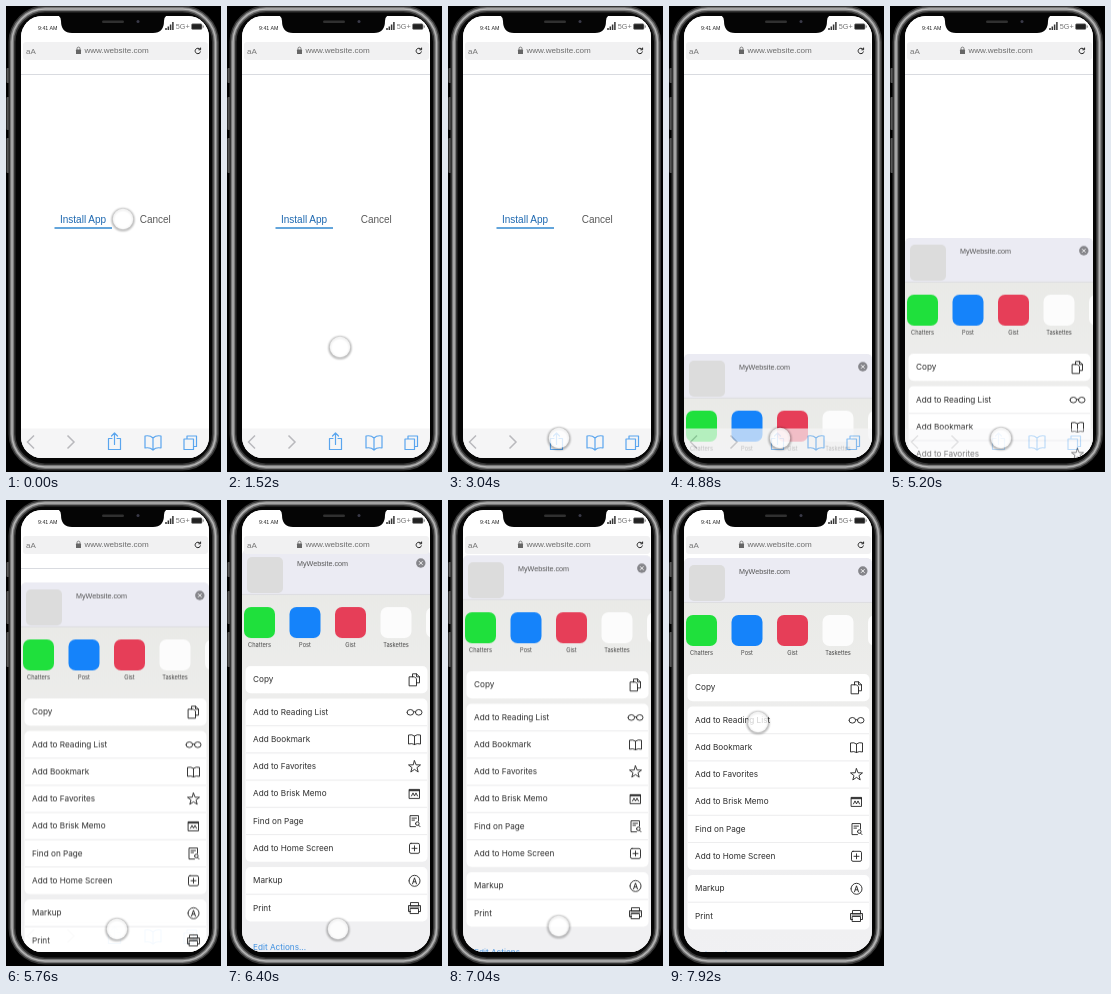
An HTML page for the animation above (8000 ms loop, 215 by 466 pixels).

```html
<!DOCTYPE html>
<html lang="en">
<head>
<meta charset="utf-8">
<title>Install from share sheet</title>
<style>
html, body { margin: 0; width: 100%; height: 100%; overflow: hidden; background: #000; }
svg { display: block; width: 100vw; height: 100vh; }
text { font-family: "Liberation Sans", Arial, sans-serif; }
.row, .label { font-family: Inter, Roboto, sans-serif; }
.row { font-size: 8.2px; fill: #2c2c2c; }
.label { font-size: 5.7px; fill: #444; text-anchor: middle; }
.line { fill: none; stroke: #222; stroke-width: .9; stroke-linejoin: round; stroke-linecap: round; }
.blue { fill: none; stroke: #5aa5ee; stroke-width: 1.2; stroke-linejoin: round; stroke-linecap: round; }

#prompt, #toolbar, #sheet, #touch { animation: 8s linear infinite; }
#prompt { animation-name: prompt; }
#toolbar { animation-name: toolbar; }
#sheet { animation-name: sheet; }
#touch { animation-name: touch; }

@keyframes prompt {
  0%, 48% { opacity: 1; }
  57%, 100% { opacity: 0; }
}
@keyframes toolbar {
  0%, 56.5% { opacity: 1; }
  61% { opacity: .7; }
  65% { opacity: .4; }
  72% { opacity: .06; }
  77%, 100% { opacity: 0; }
}
@keyframes sheet {
  0%, 56% { transform: translateY(466px); }
  58% { transform: translateY(433px); }
  61% { transform: translateY(348px); }
  65% { transform: translateY(232px); }
  67% { transform: translateY(179px); }
  69% { transform: translateY(134px); }
  72% { transform: translateY(82.5px); }
  74% { transform: translateY(64px); }
  76% { transform: translateY(54px); }
  78% { transform: translateY(50.5px); }
  80% { transform: translateY(50px); }
  84% { transform: translateY(52px); }
  89% { transform: translateY(56px); }
  94%, 100% { transform: translateY(58px); }
}
@keyframes touch {
  0%, 3% { transform: translate(117px, 213px); animation-timing-function: ease-in-out; }
  18%, 23% { transform: translate(113px, 341px); animation-timing-function: ease-in-out; }
  36%, 66% { transform: translate(111px, 432px); }
  71%, 87% { transform: translate(111px, 429px); animation-timing-function: ease-in-out; }
  99%, 100% { transform: translate(89px, 222px); }
}
</style>
</head>
<body>
<svg viewBox="0 0 215 466" preserveAspectRatio="none">
  <defs>
    <clipPath id="screen"><rect x="15" y="10" width="188" height="442" rx="21"/></clipPath>
    <linearGradient id="shade" x2="0" y2="1">
      <stop offset="0" stop-color="#e8e9e5"/>
      <stop offset=".3" stop-color="#ededec"/>
      <stop offset="1" stop-color="#f1f1f4"/>
    </linearGradient>
    <filter id="soft" x="-50%" y="-50%" width="200%" height="200%">
      <feGaussianBlur stdDeviation="1"/>
    </filter>
  </defs>

  <rect width="215" height="466" fill="#000"/>
  <g fill="#555">
    <rect x=".5" y="62" width="3" height="15" rx="1"/>
    <rect x=".5" y="91" width="3" height="33" rx="1"/>
    <rect x=".5" y="132" width="3" height="35" rx="1"/>
  </g>
  <g id="rim" fill="none">
    <rect x="6" y="3" width="203.500" height="458" rx="33" fill="#050505" stroke="#333" stroke-width="7"/>
    <rect x="6" y="3" width="203.500" height="458" rx="33" stroke="#777" stroke-width="4"/>
    <rect x="6" y="3" width="203.500" height="458" rx="33" stroke="#b4b4b4" stroke-width="1.500"/>
  </g>

  <g clip-path="url(#screen)">
    <rect x="15" y="10" width="188" height="442" fill="#fff"/>
    <path d="M15 68.5H203" stroke="#d9dbe0"/>

    <g id="prompt" font-size="10">
      <text x="54" y="216.6" fill="#1d68b0">Install App</text>
      <path d="M48.5 222H106" stroke="#2f87cf" stroke-width="1.4"/>
      <text x="133.7" y="216.6" fill="#5a5a5a">Cancel</text>
    </g>

    <g id="sheet">
      <path d="M15 450V6q0-6 6-6H197q6 0 6 6V450Z" fill="url(#shade)"/>
      <path d="M15 44V6q0-6 6-6H197q6 0 6 6V44Z" fill="#ebebf3"/>
      <path d="M15 44.5H203" stroke="#dcdce0" stroke-width=".8"/>
      <rect x="20" y="7" width="36" height="36" rx="5" fill="#dcdcdc"/>
      <text x="70" y="15.8" font-size="7.2" fill="#555">MyWebsite.com</text>
      <circle cx="193.8" cy="13" r="4.7" fill="#85858a"/>
      <path d="M192 11.2l3.6 3.6m0-3.6l-3.6 3.6" stroke="#fff" stroke-width=".9"/>
      <g id="apps"></g>
      <g id="actions"></g>
      <text class="row" x="26" y="400" style="fill:#3d8fe0">Edit Actions...</text>
    </g>

    <rect x="15" y="10" width="188" height="40" fill="#fff"/>
    <rect x="17" y="36" width="185" height="18" rx="3" fill="#f1f1f2"/>
    <text x="20" y="47.5" font-size="8" fill="#777">aA</text>
    <rect x="70" y="43.6" width="5" height="4.4" rx=".6" fill="#666"/>
    <path d="M71 44v-1.4a1.5 1.5 0 0 1 3 0V44" fill="none" stroke="#666" stroke-width=".8"/>
    <text x="78.4" y="47.4" font-size="8.1" fill="#6c6c6c">www.website.com</text>
    <path d="M194 43.3a2.7 2.7 0 1 0 .5 2.2M194.6 41.6v2.2h-2.2" fill="none" stroke="#222" stroke-width="1"/>

    <g id="toolbar">
      <rect x="15" y="422.5" width="188" height="30" fill="#f5f5f6"/>
      <path d="M28 429.5l-6.5 6.5 6.5 6.5M61.5 429.5l6.5 6.5-6.5 6.5" fill="none" stroke="#b9b9bd" stroke-width="1.5"/>
      <path class="blue" d="M106 432.5h-3.500v11h12v-11H111M108.500 438.500V427m-3 3l3-3 3 3"/>
      <path class="blue" d="M147 432q-3-3-8-2v12q5-1 8 2 3-3 8-2v-12q-5-1-8 2v12"/>
      <path class="blue" d="M178 433h9.5v10.500H178ZM181 432.500V430h9.500v10.500H188"/>
    </g>

    <path d="M49 9q6 0 6 6 0 12 11 12h81q11 0 11-12 0-6 6-6Z" fill="#050505"/>
    <text x="32" y="23.6" font-size="5.3" fill="#222">9:41 AM</text>
    <path d="M160 24v-2m2.300 2v-3.500m2.300 3.500v-5.500m2.300 5.500v-8" stroke="#333" stroke-width="1.5"/>
    <text x="169.7" y="23.2" font-size="7.3" fill="#777">5G+</text>
    <rect x="185.5" y="17.8" width="10.5" height="5.6" rx="1.2" fill="#222" stroke="#888" stroke-width=".6"/>
    <path d="M197.200 19.500v2.200" stroke="#777"/>
  </g>
  <rect x="96" y="14.500" width="22" height="2.500" rx="1.200" fill="#303030"/>
  <circle cx="132" cy="15.500" r="1.500" fill="#3a3a48"/>

  <g id="touch">
    <circle r="10.400" cy=".7" fill="none" stroke="#000" stroke-width="1.800" opacity=".4" filter="url(#soft)"/>
    <circle r="10.200" fill="#fff" opacity=".78"/>
  </g>
</svg>
<script>
const apps = [
  ["Chatters", "#1fe03c"],
  ["Post", "#1583fa"],
  ["Gist", "#e63e58"],
  ["Taskettes", "#fcfcfc"],
  ["", "#fcfcfc"]
];
document.getElementById("apps").innerHTML = apps.map(([name, color], i) => {
  const x = 32.5 + i * 45.5;
  return `<rect x="${x - 15.5}" y="57" width="31" height="31" rx="7" fill="${color}"/>
    <text class="label" x="${x}" y="97.5">${name}</text>`;
}).join("");

// Each icon is a path centred on the origin.
const icons = {
  copy: "M-2-3V-6H2L5-3V3H2M2-6V-3H5M-5-3H0L2-1V6H-5Z",
  glasses: "M-7.5 0a3.3 2.8 0 1 0 6.6 0a3.3 2.8 0 1 0-6.6 0M.9 0a3.3 2.8 0 1 0 6.6 0a3.3 2.8 0 1 0-6.6 0M-.9-.5Q0-1.2 .9-.5",
  book: "M0-3.5Q-2.5-5.5-6-4.5V4.5Q-2.5 3.5 0 5Q2.5 3.5 6 4.5V-4.5Q2.5-5.5 0-3.5V5",
  star: "M0-6L1.6-1.9 6-1.8 2.5.9 3.7 5.2 0 2.7-3.7 5.2-2.5.9-6-1.8-1.6-1.9Z",
  note: "M-5-4.5H5V4.5H-5ZM-5-3.2H5M-5-3.8H5M-3 2L-1.5-1 0 2 1.5-1 3 2",
  find: "M4 0V-5.5H-4.5V5.5H1M-2.5-3H2M-2.5-1H0M1 2.5a1.8 1.8 0 1 0 3.6 0a1.8 1.8 0 1 0-3.6 0M4 4L5.5 5.5",
  plus: "M-3.5-5H3.5Q5-5 5-3.5V3.5Q5 5 3.5 5H-3.5Q-5 5-5 3.5V-3.5Q-5-5-3.5-5ZM-2.5 0H2.5M0-2.5V2.5",
  pen: "M-5.5 0a5.5 5.5 0 1 0 11 0a5.5 5.5 0 1 0-11 0M-2 3L0-3 2 3M-1 1H1",
  print: "M-4-2.5V-5.5H4V-2.5M-4 3.5H-6V-2.5H6V3.5H4M-4 .5H4V5.5H-4ZM-4.5-1H4.5"
};
const cards = [
  [116, [["Copy", "copy"]]],
  [148.5, [
    ["Add to Reading List", "glasses"], ["Add Bookmark", "book"], ["Add to Favorites", "star"],
    ["Add to Brisk Memo", "note"], ["Find on Page", "find"], ["Add to Home Screen", "plus"]]],
  [317, [["Markup", "pen"], ["Print", "print"]]]
];
const pitch = 27.2;
const row = ([name, icon], y, first) => `
  ${first ? "" : `<path d="M19 ${y}H200" stroke="#e4e4e6" stroke-width=".7"/>`}
  <text class="row" x="26" y="${y + 16.4}">${name}</text>
  <path class="line" transform="translate(187.5 ${y + 13.8})" d="${icons[icon]}"/>`;
document.getElementById("actions").innerHTML = cards.map(([top, rows]) =>
  `<rect x="18.5" y="${top}" width="182" height="${rows.length * pitch}" rx="5" fill="#fff"/>` +
  rows.map((r, i) => row(r, top + i * pitch, i === 0)).join("")
).join("");
</script>
</body>
</html>
```
